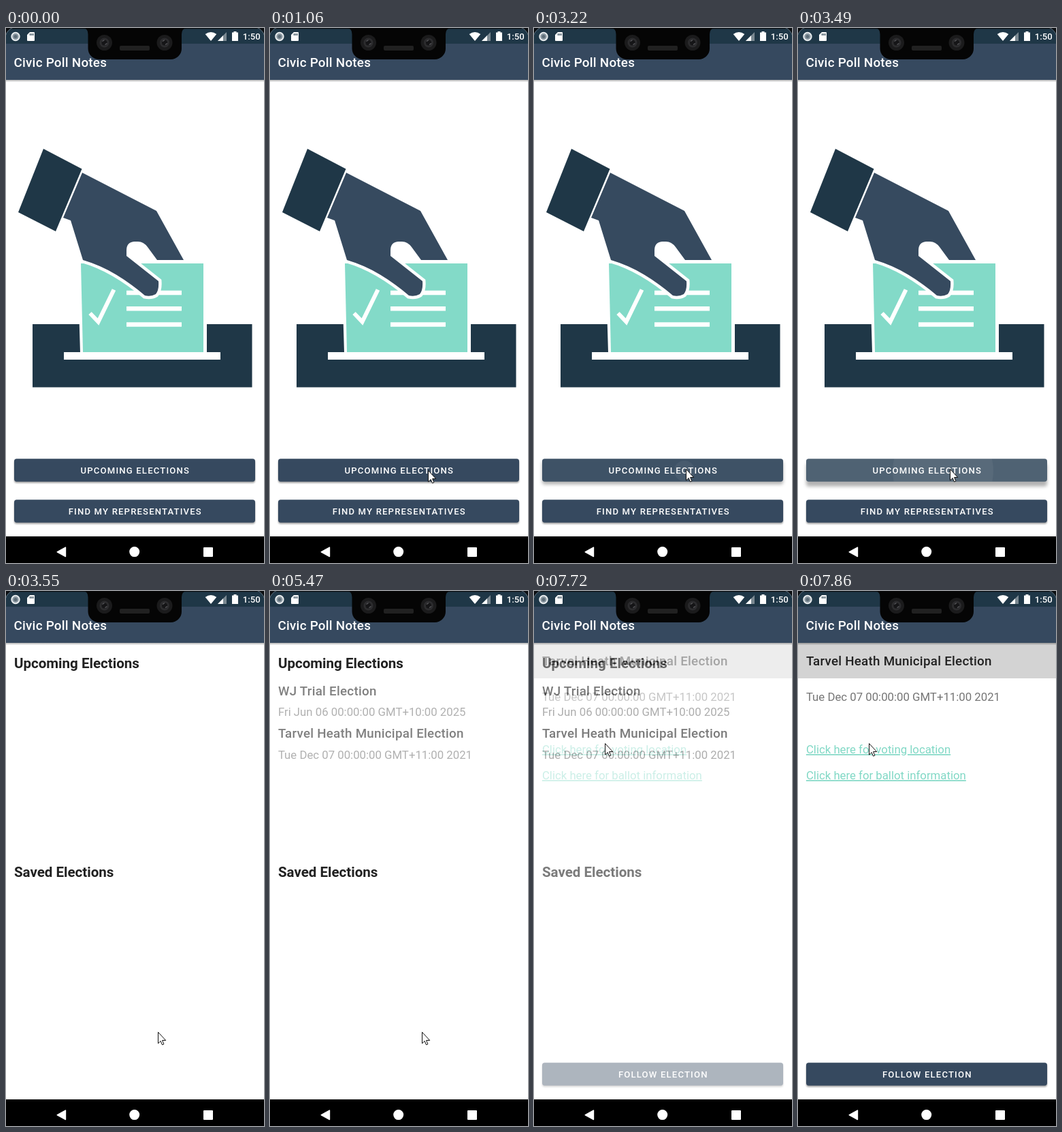
These frames come from a looping animation (379x784 px, 7.99 s). An HTML page:

```html
<!DOCTYPE html>
<html lang="en">
<head>
<meta charset="utf-8">
<title>Election app demo</title>
<style>
  html, body { margin: 0; width: 100%; height: 100%; overflow: hidden; background: #fff; }
  svg { display: block; width: 100%; height: 100%; font-family: Roboto, sans-serif; }
  .title { font-size: 18.8px; font-weight: 500; letter-spacing: .25px; }
  .head { font-size: 20.55px; font-weight: 700; fill: #212121; }
  .item { fill: #212121; }
  .body { font-size: 16.77px; fill: #757575; }
  .link { fill: #80d8c5; text-decoration: underline 1px; text-underline-offset: 1.9px; text-decoration-skip-ink: none; }
  .label { font-size: 13.1px; font-weight: 500; letter-spacing: 1.18px; fill: #fff; text-anchor: middle; }
  .btn { filter: drop-shadow(0 2px 1.3px rgba(0,0,0,.36)); }
  .clock { font-size: 13.1px; font-weight: 500; fill: #fff; }
</style>
</head>
<body>
<svg viewBox="0 0 379 784">
  <defs>
    <linearGradient id="shade" x2="0" y2="1">
      <stop offset="0" stop-opacity=".3"/>
      <stop offset="1" stop-opacity="0"/>
    </linearGradient>
    <pattern id="mesh" width="2" height="2" patternUnits="userSpaceOnUse">
      <rect width="2" height="2" fill="#111"/>
      <circle cx="1" cy="1" r=".7" fill="#3c3c3c"/>
    </pattern>
    <clipPath id="btnClip"><rect x="12" y="631.2" width="354" height="33.6" rx="3.7"/></clipPath>
    <g id="camera">
      <circle r="11.5" fill="#1b1b1c"/>
      <circle r="7" fill="#2c2c2e"/>
      <circle r="4" fill="#151517"/>
      <path d="M-3-2L0-4M1 3L4 1" stroke="#5a5a5e" stroke-width="1.3"/>
    </g>
  </defs>

  <rect width="379" height="784" fill="#fff"/>

  <g id="home">
    <path d="M39 434H361.5V526.5H39Z" fill="#1f3747"/>
    <path d="M107.5 425H295V476H109Z M85 475H315V486H85Z" fill="#fff"/>
    <path d="M110 345H290V475H113Z" fill="#83dac8"/>
    <path d="M177 388H258M177 411.3H258M177 434.5H258" stroke="#fff" stroke-width="6.5"/>
    <path d="M123.5 418L135.5 430.5L158.5 383.5" fill="none" stroke="#fff" stroke-width="6"/>
    <path d="M112 212L221 268L261 340H222L208 321Q202 313 194 313H188Q177 314 177 326V334L224 371Q225 384 220 390Q213 394 204 392C178 370 148 350 113 340L95 282L84 278Z"
      fill="#364a5f" stroke="#fff" stroke-width="9" paint-order="stroke"/>
    <path d="M55 177L111.5 206.5L73 298L18 270Z" fill="#1f3747"/>
    <rect id="upBtn" class="btn" x="12" y="631.2" width="354" height="33.6" rx="3.7"/>
    <circle id="ripple" cy="649" fill="#fff" fill-opacity=".05" clip-path="url(#btnClip)"/>
    <text class="label" x="189.8" y="653.4">UPCOMING ELECTIONS</text>
    <rect class="btn" x="12" y="691.2" width="354" height="33.6" rx="3.7" fill="#36495f"/>
    <text class="label" x="189.8" y="713.2">FIND MY REPRESENTATIVES</text>
  </g>

  <g id="list">
    <text class="head" x="11.9" y="112.5">Upcoming Elections</text>
    <g id="items">
      <text class="title item" x="11.9" y="152.7">WJ Trial Election</text>
      <text class="body" x="11.9" y="183">Fri Jun 06 00:00:00 GMT+10:00 2025</text>
      <text class="title item" x="11.9" y="215.2">Tarvel Heath Municipal Election</text>
      <text class="body" x="11.9" y="245.5">Tue Dec 07 00:00:00 GMT+11:00 2021</text>
    </g>
    <text class="head" x="11.9" y="419">Saved Elections</text>
  </g>

  <g id="detail">
    <rect y="76" width="379" height="669" fill="#fff"/>
    <rect y="76" width="379" height="52" fill="#d3d3d3"/>
    <text class="title item" x="11.9" y="109.2">Tarvel Heath Municipal Election</text>
    <text class="body" x="11.9" y="161">Tue Dec 07 00:00:00 GMT+11:00 2021</text>
    <text class="body link" x="11.9" y="238">Click here for voting location</text>
    <text class="body link" x="11.9" y="276">Click here for ballot information</text>
    <rect class="btn" x="12" y="691.2" width="354" height="33.6" rx="3.7" fill="#36495f"/>
    <text class="label" x="189.8" y="713.2">FOLLOW ELECTION</text>
  </g>

  <g id="chrome">
    <rect y="76" width="379" height="3.5" fill="url(#shade)"/>
    <rect width="379" height="76" fill="#36495f"/>
    <rect width="379" height="23" fill="#1f3747"/>
    <path d="M0 0H379V1.2H0Z" fill="#0a0d10"/>
    <path d="M-1-1H11Q2 2-1 12ZM380-1H368Q377 2 380 12Z" fill="#0a0d10" stroke="#6f8090" stroke-width=".8"/>
    <text class="title" x="11.5" y="56.8" fill="#fff">Civic Poll Notes</text>

    <path d="M114 0Q120.5 1 120.5 9V30A16 16 0 0 0 136.5 46H242A16 16 0 0 0 258 30V9Q258 1 265 0Z" fill="#050505"/>
    <use href="#camera" x="144.5" y="21.5"/>
    <use href="#camera" x="233" y="21.5"/>
    <rect x="167" y="26" width="44" height="7" rx="2" fill="url(#mesh)"/>

    <circle cx="14" cy="12.5" r="5.7" fill="#8d9aa3" stroke="#e8ecee" stroke-width="2"/>
    <circle cx="14" cy="12.5" r="2.5" fill="#5d6d78"/>
    <path d="M35 6H41Q42 6 42 7V18Q42 19 41 19H32Q31 19 31 18V10Z" fill="#fff"/>
    <path d="M35.5 8V11M37.7 8V11M39.9 8V11" stroke="#1f3747" stroke-width="1.1"/>
    <path d="M292.7 9Q301 3 309.3 9L301 19Z" fill="#fff"/>
    <path d="M324 6V19H311Z" fill="#7b8992"/>
    <path d="M319 11V19H311Z" fill="#fff"/>
    <path d="M334.5 5H338.5V6.5H341V19H332V6.5H334.5Z" fill="#fff"/>
    <text class="clock" x="347.8" y="17.4">1:50</text>

    <rect y="745" width="379" height="39" fill="#000"/>
    <path d="M75.2 767.8L87.5 761V774.6Z" fill="#fff" stroke="#fff" stroke-width="1.4" stroke-linejoin="round"/>
    <circle cx="188.7" cy="767.6" r="7.5" fill="#fff"/>
    <rect x="290" y="761" width="14" height="14" rx="1" fill="#fff"/>
  </g>

  <path id="cursor" d="M.5.5V17L4.2 13.500L6.500 19L8.900 18L6.600 12.500H11.700Z" fill="#fff" stroke="#111"/>
</svg>
<script>
const LOOP = 7990, STEP = 69.2;
const $ = id => document.getElementById(id);
const [home, list, items, detail, upBtn, ripple, cursor] =
  ['home', 'list', 'items', 'detail', 'upBtn', 'ripple', 'cursor'].map($);

const clamp = v => Math.min(1, Math.max(0, v));
const mix = (a, b, u) => a + (b - a) * u;
const linear = u => u;
const easeOut = u => 1 - (1 - u) ** 2;
const easeInOut = u => u * u * (3 - 2 * u);

// start, end, from x y, to x y, easing
const moves = [
  [370, 1130, 331, 772, 231, 647, easeOut],
  [1130, 1406, 231, 647, 223, 646, linear],
  [6211, 6833, 223, 646, 103, 277, easeInOut],
  [6833, 7041, 103, 277, 103, 243, easeOut],
  [7041, 7318, 103, 243, 104, 223, easeOut]
];

const sample = (t, base) => base + Math.floor((t - base) / STEP + .1) * STEP;
const show = (el, on) => el.setAttribute('visibility', on ? 'visible' : 'hidden');

function drawCursor(t) {
  show(cursor, t >= 370);
  const q = sample(t, t < 5000 ? 370 : 6280);
  const m = moves.filter(v => q >= v[0] - 1).pop() || moves[0];
  const u = m[6](clamp((q - m[0]) / (m[1] - m[0])));
  const x = Math.round(mix(m[2], m[4], u)), y = Math.round(mix(m[3], m[5], u));
  cursor.setAttribute('transform', `translate(${x} ${y})`);
}

function drawButton(t) {
  const hover = t < 1880 ? 0 : t < 2010 ? .5 : 1;
  const press = t < 3220 ? 0 : clamp((sample(t, 3220) - 3220 + STEP) / (270 + STEP));
  const tone = (a, b, c) => Math.round(mix(mix(a, b, hover), c, press));
  upBtn.setAttribute('fill', `rgb(${tone(54, 58, 79)},${tone(73, 78, 98)},${tone(95, 99, 115)})`);
  const dy = mix(2 + 2 * hover, 7, press), blur = mix(1.3 + hover, 2.8, press);
  upBtn.style.filter = `drop-shadow(0 ${dy}px ${blur}px rgba(0,0,0,${.36 - .06 * hover}))`;
  ripple.setAttribute('cx', mix(223, 213, press));
  ripple.setAttribute('r', 74 * press);
}

function render(t) {
  show(home, t < 3550);
  show(list, t >= 3550);
  items.setAttribute('opacity', t < 5470 ? 0 : t < 5540 ? .57 : 1);
  show(detail, t >= 7590);
  detail.setAttribute('opacity', clamp(.2 + .8 * (sample(t, 7590) - 7590) / 270));
  drawButton(t);
  drawCursor(t);
}

const start = performance.now();
function tick() {
  render((performance.now() - start) % LOOP);
  requestAnimationFrame(tick);
}
tick();
</script>
</body>
</html>
```
